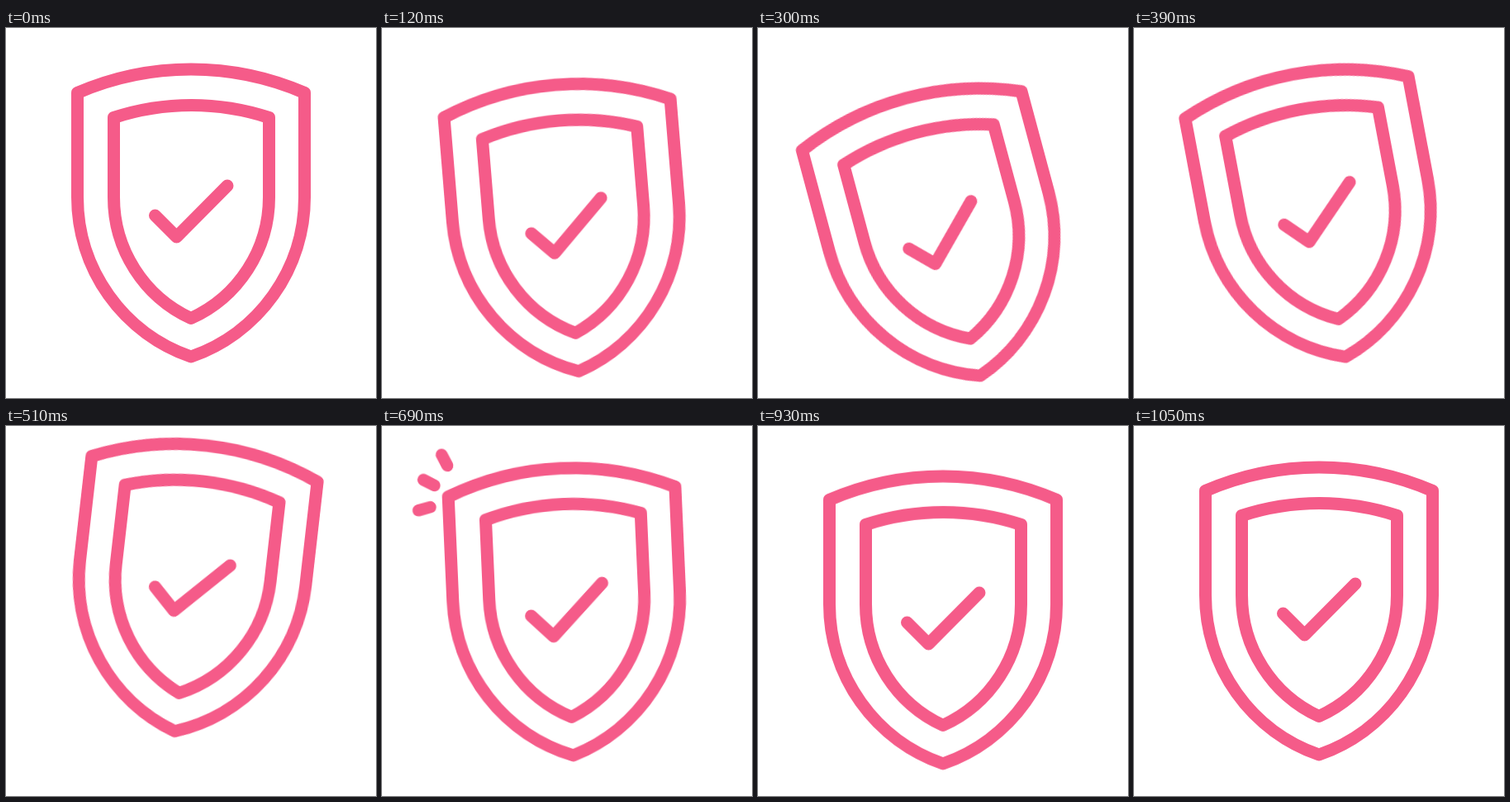
Write an HTML page without scripts that moves like this. It is 448x448 px and loops after 1500 ms.

```html
<!DOCTYPE html>
<html lang="en">
<head>
<meta charset="utf-8">
<title>Shield check</title>
<style>
  html, body {
    margin: 0;
    width: 100%;
    height: 100%;
    overflow: hidden;
    background: #fff;
  }

  svg {
    display: block;
    width: 100%;
    height: 100%;
    fill: none;
    stroke: #f55b89;
    stroke-width: 15;
    stroke-linecap: round;
    stroke-linejoin: round;
  }

  .bounce, .tilt {
    transform-origin: 224px 224px;
    animation: 1500ms cubic-bezier(.3333, 0, .6667, 1) infinite;
  }
  .bounce { animation-name: bounce; }
  .tilt { animation-name: tilt; }

  .sparks {
    stroke-width: 14.5;
    stroke-dasharray: 15 200;
    animation: fly 1500ms linear infinite, show 1500ms step-end infinite;
  }

  @keyframes bounce {
    0%, 70%, 100% { transform: translateY(0); }
    16% { transform: translateY(36px); }
    36% { transform: translateY(-29px); }
    54% { transform: translateY(22px); }
  }

  @keyframes tilt {
    0%, 54%, 100% { transform: rotate(0deg); }
    22% { transform: rotate(-15.4deg); }
    36% { transform: rotate(7.7deg); }
    48% { transform: rotate(-3.3deg); }
  }

  /* each dash slides outward along its line */
  @keyframes fly {
    0%, 40% { stroke-dashoffset: 15; }
    58.9%, 100% { stroke-dashoffset: -53; }
  }

  @keyframes show {
    0%, 58%, 100% { visibility: hidden; }
    40.5% { visibility: visible; }
  }
</style>
</head>
<body>
<svg viewBox="0 0 448 448">
  <g class="bounce">
    <g class="tilt">
      <path d="M86.5 78.5A346 346 0 0 1 361.5 78.5V205A204.2 204.2 0 0 1 224 398A204.2 204.2 0 0 1 86.5 205Z"/>
      <path d="M130.5 108.5A302.5 302.5 0 0 1 318.5 108.5V205A161 161 0 0 1 224 351.5A161 161 0 0 1 130.5 205Z"/>
      <path d="M180.5 227L206.5 253L268 191"/>
      <g class="sparks">
        <path d="M90 47L68.2 0"/>
        <path d="M76.3 67.5L30.3 41"/>
        <path d="M71 88.5L19.5 100.2"/>
      </g>
    </g>
  </g>
</svg>
</body>
</html>
```
